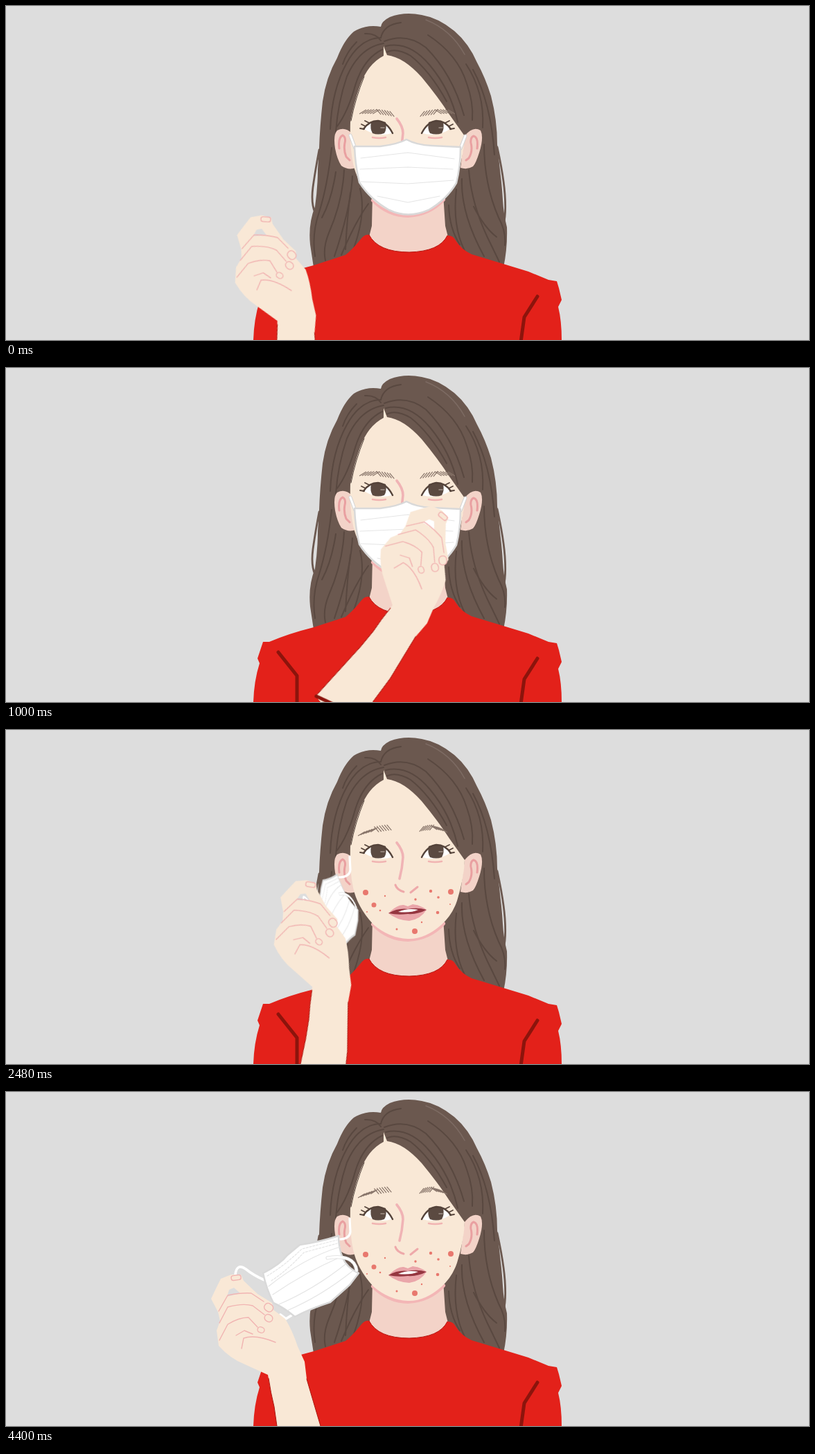
An HTML page that plays this animation: 1159 px wide and 483 px high, repeating every 4440 ms.

```html
<!DOCTYPE html>
<html lang="en">
<head>
<meta charset="utf-8">
<title>Taking off a mask</title>
<style>
html, body { margin: 0; width: 100%; height: 100%; overflow: hidden; background: #ddd; }
svg { display: block; width: 100vw; height: 100vh; }
.line { fill: none; stroke-linecap: round; stroke-linejoin: round; }
.skin { fill: #f9e8d6; }
.shade { fill: #f3d3c8; }
.hair { fill: #6b584f; }
.strand { stroke: #594840; stroke-width: 2; }
.pink { stroke: #f1b4b2; stroke-width: 1.4; }
.mask { fill: #fff; stroke: #d9d9d9; stroke-width: 2.5; stroke-linejoin: round; }
.pleat { stroke: #e5e5e5; stroke-width: 1.2; }
.seam { stroke: #8c140c; stroke-width: 5; }
</style>
</head>
<body>
<svg viewBox="0 0 1159 483" xmlns="http://www.w3.org/2000/svg">
  <rect width="1159" height="483" fill="#ddd"/>

  <g id="hair">
    <path class="hair" d="M541,30 Q520,26 502,37 Q488,49 478,75 Q462,103 457,138 Q453,175 452,205 L450,236 Q450,262 446,290
      Q436,315 439,345 L444,378 H718 Q724,350 723,320 Q718,300 717,280 Q716,262 714,246 L709,200 Q709,165 700,130
      Q692,104 680,82 Q668,54 647,36 Q624,17 600,13 Q575,8 554,16 Q542,22 541,30Z"/>
    <path class="line" stroke="#6b584f" stroke-width="2.8" d="M452,208 Q446,240 443,262 Q440,285 446,299 M709,204 Q718,245 720,272 Q722,302 718,316"/>
    <g class="line strand">
      <path d="M541,46 Q512,46 492,82 Q470,122 468,178"/>
      <path d="M545,54 Q510,60 492,102 Q479,140 476,182"/>
      <path d="M543,63 Q516,76 504,115 Q494,152 478,174"/>
      <path d="M518,40 Q534,39 541,50 M506,52 Q492,66 486,84"/>
      <path d="M541,46 Q545,27 570,24"/>
      <path d="M546,51 Q578,38 606,60 Q644,98 661,158"/>
      <path d="M548,58 Q582,50 612,86 Q642,122 652,168"/>
      <path d="M547,68 Q562,59 584,72 Q612,94 636,138"/>
      <path d="M609,42 Q652,70 665,112 Q675,140 673,165"/>
      <path d="M664,84 Q691,125 688,176"/>
      <path d="M674,92 Q700,140 705,215"/>
      <path d="M470,205 Q464,260 452,298 Q441,330 446,362"/>
      <path d="M488,237 Q486,282 466,328 Q457,350 461,368"/>
      <path d="M500,246 Q498,290 474,362 M476,240 Q470,280 456,306"/>
      <path d="M511,264 Q520,300 502,350 M497,270 Q492,310 490,352"/>
      <path d="M523,286 Q504,312 484,360"/>
      <path d="M668,237 Q672,290 700,345 L712,370"/>
      <path d="M690,200 Q690,258 711,306 Q722,326 720,346"/>
      <path d="M650,265 Q644,318 662,354"/>
      <path d="M658,250 Q656,300 690,362 M675,290 Q690,320 708,334"/>
      <path d="M639,288 Q640,322 655,345"/>
    </g>
    <path class="line" stroke="#7d6b63" stroke-width="1.5" d="M606,20 Q642,34 662,70"/>
  </g>

  <path class="shade" d="M529,272 L528,318 L524,334 Q538,358 582,358 Q624,356 638,334 L634,318 L631,272Z"/>
  <path fill="#e3211a" d="M524,331 Q537,356 582,356 Q626,355 637,332 Q645,331 649,339 Q657,352 672,359 L718,373 L754,384
    L783,396 L795,398 L798,408 L802,425 L797,435 Q802,455 802,483 H357 Q358,452 366,427 L363,420 L371,396 L380,396
    Q408,384 444,375 L490,360 Q501,351 513,336 Q518,330 524,331Z"/>
  <path class="line" stroke="#b5150f" d="M524,331 Q537,356 582,356 Q626,355 637,332"/>
  <path class="line seam" d="M393,411 L420,445 V486 M767,420 L748,450 L743,486"/>

  <path class="shade" d="M499,184 Q489,174 478,180 Q472,186 475,206 Q478,222 484,231 Q494,238 505,234Z
    M662,188 Q674,173 685,180 Q690,190 683,212 Q678,228 674,232 Q666,237 656,234Z"/>
  <path class="line" stroke="#e9a0a1" stroke-width="3" d="M481,206 Q479,190 486,187 Q491,190 489,198 Q487,208 491,218 L496,223
    M680,206 Q682,190 675,188 Q670,190 671,198 Q674,210 668,220 L664,223"/>

  <path class="line" stroke="#f3b6b6" stroke-width="6" d="M530,281 Q552,303 580,303 Q610,302 631,280"/>
  <path class="skin" d="M545,58 L550,71 Q574,74 600,103 Q624,132 640,157 L662,188 Q661,215 651,247 Q644,268 628,282
    Q604,303 580,302 Q553,301 530,281 Q507,256 501,228 Q496,205 497,168 Q502,140 511,115 Q522,84 545,72Z"/>
  <path class="line" stroke="#4f4039" stroke-width="1" d="M517,102 Q504,134 498,166"/>

  <g id="eye">
    <path fill="#fff" d="M517,178 Q525,167 537,166 Q550,169 557,184 Q536,190 517,178Z"/>
    <path fill="#5b4a41" d="M527,168 Q538,164 548,168 Q550,178 546,184 Q537,187 529,184 Q525,177 527,168Z"/>
    <path class="line" stroke="#54433a" stroke-width="2.4" d="M516,178 Q524,166 537,166 Q550,168 558,184"/>
    <path class="line" stroke="#54433a" stroke-width="1.8" d="M511,177 L517,178 M513,171 L519,174 M518,166 L524,169"/>
    <path class="line" stroke="#f1b4b2" stroke-width="2.5" d="M529,190 Q539,192 548,190"/>
  </g>
  <use href="#eye" transform="matrix(-1 0 0 1 1158 0)"/>
  <path class="line" stroke="#a3948b" stroke-width="1.5" d="M541,176 h5 M625,176 h5"/>

  <g class="line" stroke="#88756a" stroke-width="1.2">
    <path id="calmBrows"/>
    <path id="sadBrows"/>
  </g>

  <path class="line" stroke="#f0b3b5" stroke-width="3.6" d="M564,163 Q573,174 573,184 Q572,200 568,215"/>
  <path class="line" stroke="#eea9aa" stroke-width="3" d="M562,224 Q564,231 574,234 M584,235 L594,227"/>
  <path fill="#eaa6aa" d="M552,265 Q565,252 574,253 L580,255 L587,252 Q598,253 607,260 Q598,274 582,276 Q564,275 552,265Z"/>
  <path fill="#953640" d="M552,265 Q566,257 580,259 Q594,256 607,260 Q594,267 580,266 Q566,268 552,265Z"/>
  <path fill="#fff" d="M566,263 Q580,257 595,260 Q584,265 566,263Z"/>
  <g id="spots" fill="#e8786e"></g>

  <g id="wornMask">
    <path class="line" stroke="#d4d4d4" stroke-width="5" d="M497,187 L504,206 M663,188 L656,206"/>
    <path class="line" stroke="#fff" stroke-width="3" d="M497,187 L504,206 M663,188 L656,206"/>
    <path class="mask" d="M503,203 L540,203 Q565,200 578,193 Q592,201 615,202 L656,204 Q656,232 650,256 Q636,280 610,295
      Q580,308 553,295 Q526,280 510,255 Q504,230 503,203Z"/>
    <path class="line pleat" d="M512,220 L580,212 L647,221 M511,236 L580,233 L645,236 M512,254 L580,257 L646,252 M536,275 L580,284 L626,275"/>
  </g>

  <g id="foldedMask">
    <path class="mask" d="M497,205 Q530,207 550,208 L563,205 L605,209 L601,278 Q560,305 529,300 Q512,275 508,252 Q500,228 497,205Z"/>
    <path class="line pleat" d="M503,222 L560,224 M506,238 L560,235 M510,255 L560,256 M520,277 L560,283"/>
  </g>

  <path id="earStrap" class="line" stroke="#fff" stroke-width="3.2" d="M496,183 L497,202 Q496,213 480,213"/>
  <g id="hangingMask">
    <path class="line" stroke="#fff" stroke-width="3.6" d="M373,272 Q357,265 346,256 Q333,247 331,264 M396,322 L404,328 L412,323"/>
    <path class="mask" d="M371,262 Q396,249 406,236 L424,221 Q452,217 480,208 Q480,226 486,240 Q492,254 509,262
      L496,279 L468,304 Q440,313 417,325 Q400,311 386,305 Q376,286 371,262Z"/>
    <path class="line pleat" d="M379,281 Q430,240 482,224 M385,293 Q430,262 484,238 M394,307 Q445,285 490,249 M406,316 Q455,295 500,259"/>
    <path class="line pleat" stroke-dasharray="3 2" d="M377,266 Q402,251 427,227 L478,214 M383,273 Q407,257 430,232 L478,219"/>
    <path class="line" stroke="#dcdcdc" stroke-width="5" d="M464,240 Q503,234 506,258"/>
    <path class="line" stroke="#fff" stroke-width="3.4" d="M464,240 Q503,234 506,258"/>
  </g>

  <g id="arm">
    <path class="skin" fill-rule="evenodd" d="M339,264 L325,264 L310,270 Q303,284 296,299 L306,318 L309,331 L304,345 L307,367 Q324,386 345,394
      L367,404 L378,409 Q382,435 387,455 L391,483 L400,580 H480 L462,524 L454,483 Q443,446 434,415 L431,390
      L421,368 Q413,344 403,328 L386,315 L384,305 L363,292 L343,273Z
      M319,296 L322,286 L329,283 L338,291Z"/>
    <path class="line" stroke="#a8170f" stroke-width="1" d="M379,414 Q382,435 387,455 L391,483 L400,578 M462,524 L454,483 Q443,446 434,415"/>
    <path class="line seam" d="M401,579 L425,569"/>
    <g class="line pink">
      <path d="M307,317 L320,294 Q340,290 354,291 L372,303"/>
      <path d="M308,334 L320,311 Q342,305 356,309 L373,322"/>
      <path d="M308,359 L320,336 Q336,326 350,326 L363,340"/>
      <path d="M340,371 L343,356 Q360,350 389,362 M332,352 L344,345 L356,350"/>
      <rect x="325" y="265" width="14" height="7" rx="3" transform="rotate(-8 332 268)"/>
      <rect x="373" y="306" width="13" height="11" rx="5" transform="rotate(35 379 311)"/>
      <rect x="373" y="322" width="12" height="10" rx="5" transform="rotate(30 379 327)"/>
      <rect x="363" y="340" width="10" height="8" rx="4" transform="rotate(20 368 344)"/>
    </g>
  </g>
</svg>
<script>
const LOOP = 4440, PULL = 1773, BROWS = 2040, TURN = 2250, END = 2881;
const $ = id => document.getElementById(id);

const play = (id, keys) => $(id).animate(
  keys.map(([t, style]) => ({ offset: t / LOOP, ...style })),
  { duration: LOOP, iterations: Infinity });

const showBetween = (id, from, to) => {
  const step = (t, on) => [t, { visibility: on ? 'visible' : 'hidden', easing: 'step-end' }];
  const keys = [step(0, from === 0)];
  if (from > 0) keys.push(step(from, true));
  if (to < LOOP) keys.push(step(to, false));
  keys.push(step(LOOP, to === LOOP));
  play(id, keys);
};

// Separate slanted hairs along a bow: the outer half rises, the inner half falls.
function brow(x0, y0, x1, y1, bow, flip) {
  const count = 12;
  const px = v => (flip ? 1158 - v : v).toFixed(1);
  let d = '';
  for (let i = 0; i < count; i++) {
    const k = i / (count - 1);
    const x = x0 + (x1 - x0) * k;
    const y = y0 + (y1 - y0) * k - bow * 4 * k * (1 - k);
    const [dx, dy] = k < 0.5 ? [4.5, -2.8] : [3, 3.6];
    d += `M${px(x - dx)},${(y - dy).toFixed(1)} L${px(x + dx)},${(y + dy).toFixed(1)}`;
  }
  return d;
}
$('calmBrows').setAttribute('d', brow(515, 153, 557, 156, 1.5, false) + brow(515, 153, 557, 156, 1.5, true));
$('sadBrows').setAttribute('d', brow(513, 150, 553, 141, 1.5, false) + brow(526, 145, 558, 143, 3, true));

const spots = [[519, 235, 4], [531, 253, 3.5], [540, 261, 1.3], [547, 240, 1.2], [521, 263, 1],
  [591, 245, 1.7], [613, 233, 2.2], [624, 242, 1.8], [642, 234, 4], [641, 252, 1],
  [623, 264, 2.3], [600, 278, 1.2], [590, 291, 4], [564, 288, 1.5]];
$('spots').innerHTML = spots.map(([x, y, r]) => `<circle cx="${x}" cy="${y}" r="${r}"/>`).join('');

// Arm poses: time, turn in degrees, fingertip position. The arm swings about the elbow.
const TIP = [332, 268], ELBOW = [543, 580];
const poses = [
  [0, 11.6, 375, 308], [58, 11.6, 375, 308], [400, 24.6, 466, 263], [1000, 47.6, 631, 214],
  [PULL, 47.6, 631, 214], [1840, 44.6, 613, 206], [2480, 17.2, 440, 223],
  [END, 0, 332, 268], [LOOP, 0, 332, 268]];
play('arm', poses.map(([t, turn, x, y]) => {
  const a = turn * Math.PI / 180, dx = ELBOW[0] - TIP[0], dy = ELBOW[1] - TIP[1];
  const ex = x + dx * Math.cos(a) - dy * Math.sin(a);
  const ey = y + dx * Math.sin(a) + dy * Math.cos(a);
  return [t, { transform:
    `translate(${ex}px, ${ey}px) rotate(${turn}deg) translate(${-ELBOW[0]}px, ${-ELBOW[1]}px)` }];
}));

const squeeze = s => ({ transform: `translate(497px, 0px) scale(${s}, 1) translate(-497px, 0px)` });
play('foldedMask', [[0, squeeze(1.15)], [PULL, squeeze(1.15)], [1840, squeeze(1)],
  [TURN, squeeze(0.05)], [LOOP, squeeze(0.05)]]);

const matrix = (...m) => ({ transform: `matrix(${m})` });
const edgeOn = matrix(0.114, 0.094, 0.505, 0.862, 317, -15);
const flat = matrix(1, 0, 0, 1, 0, 0);
play('hangingMask', [[0, edgeOn], [TURN, edgeOn], [2480, matrix(0.437, 0.06, 0.321, 0.912, 201.5, -9.5)],
  [END, flat], [LOOP, flat]]);

showBetween('wornMask', 0, PULL);
showBetween('foldedMask', PULL, TURN);
showBetween('hangingMask', TURN, LOOP);
showBetween('earStrap', PULL, LOOP);
showBetween('calmBrows', 0, BROWS);
showBetween('sadBrows', BROWS, LOOP);
</script>
</body>
</html>
```
